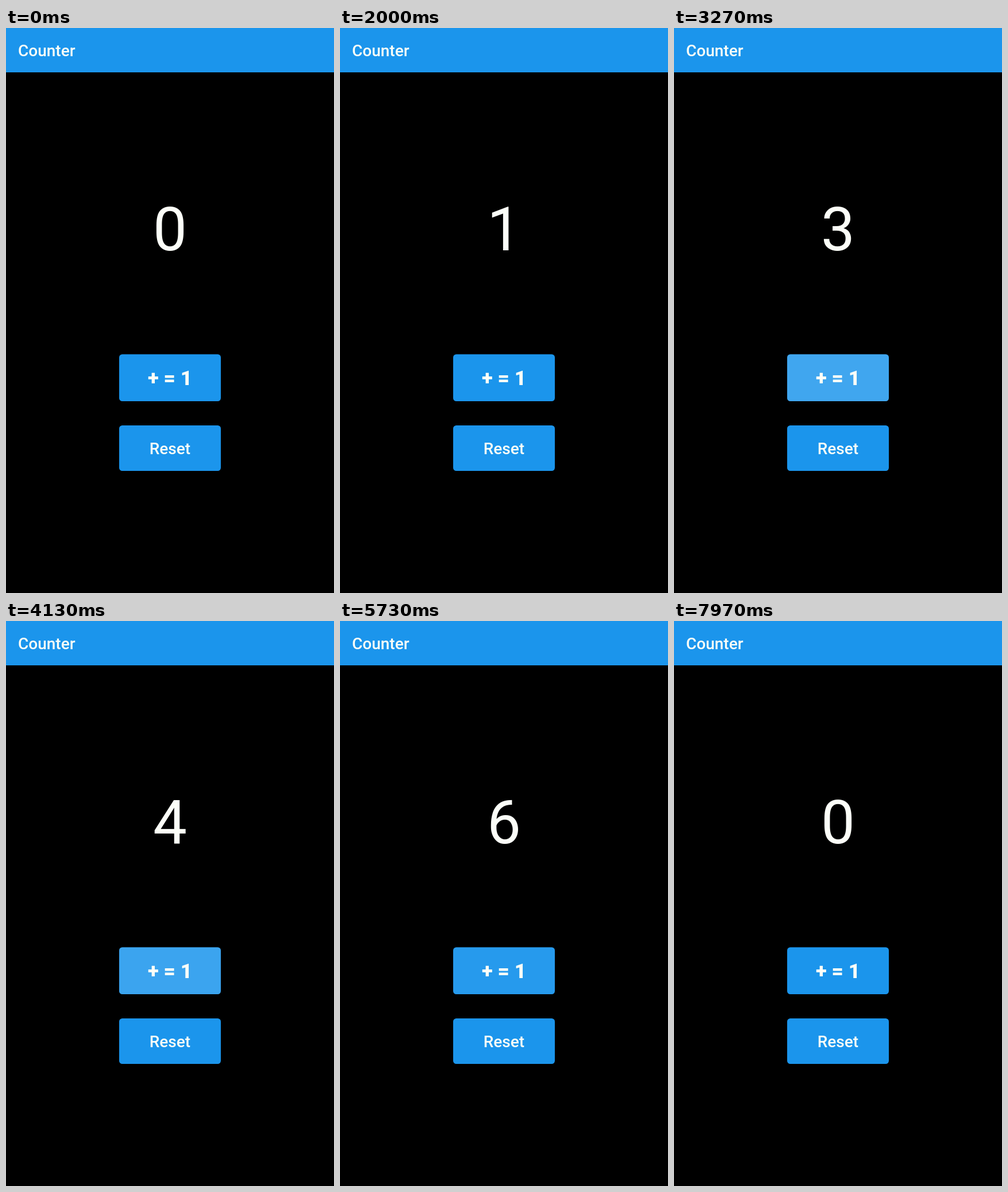
Write an HTML page with a canvas that moves like this. It is 571 px wide and 981 px high and loops after 8000 ms.

```html
<!DOCTYPE html>
<html lang="en">
<head>
<meta charset="utf-8">
<title>Counter</title>
<style>
  html, body { margin: 0; width: 100%; height: 100%; overflow: hidden; background: #000; }
  canvas { display: block; width: 571px; height: 981px; }
</style>
</head>
<body>
<canvas id="stage" width="571" height="981"></canvas>
<script>
const ctx = document.getElementById("stage").getContext("2d");
const LOOP = 8000;
const PRESS = 90;
const BLUE = "#1b95ec";
const WHITE = "#fcfef8";

const addButton = {
  x: 197, y: 566.5, w: 177, h: 81.5, label: "+ = 1", weight: 900, size: 35, baseline: 620,
  touch: [318, 618], taps: [1570, 2350, 3130, 3890, 4610, 5400, 6190]
};
const resetButton = {
  x: 197, y: 690, w: 177, h: 79, label: "Reset", weight: 500, size: 28, baseline: 740,
  touch: [310, 738], taps: [7190]
};

const clamp = v => Math.max(0, Math.min(1, v));
const mix = (a, b, p) => a + (b - a) * p;
const easeOut = p => 1 - (1 - p) ** 3;

function text(str, x, y, weight, size, align) {
  ctx.font = `${weight} ${size}px Roboto, sans-serif`;
  ctx.textAlign = align;
  ctx.fillStyle = WHITE;
  ctx.fillText(str, x, y);
}

// The ripple spreads while pressed, holds after release, then fades.
function ripple(b, t, release) {
  const age = t - release + PRESS;
  if (age < 0 || age > PRESS + 375) return;
  const grow = easeOut(clamp(age / 225));
  const fade = clamp(age / 75) * (1 - clamp((t - release - 225) / 150));
  const full = Math.hypot(b.w, b.h) / 2 + 7;
  ctx.fillStyle = `rgba(255,255,255,${0.16 * fade})`;
  ctx.beginPath();
  ctx.arc(
    mix(b.touch[0], b.x + b.w / 2, grow),
    mix(b.touch[1], b.y + b.h / 2, grow),
    full * mix(0.3, 1, grow), 0, Math.PI * 2
  );
  ctx.fill();
}

function button(b, t) {
  ctx.save();
  ctx.beginPath();
  ctx.roundRect(b.x, b.y, b.w, b.h, 5.5);
  ctx.fillStyle = BLUE;
  ctx.fill();
  ctx.clip();
  b.taps.forEach(release => ripple(b, t, release));
  ctx.restore();
  text(b.label, b.x + b.w / 2, b.baseline, b.weight, b.size, "center");
}

function draw(t) {
  ctx.fillStyle = "#000";
  ctx.fillRect(0, 0, 571, 981);
  ctx.fillStyle = BLUE;
  ctx.fillRect(0, 0, 571, 77);
  text("Counter", 21, 48.5, 500, 28, "left");

  const count = t < resetButton.taps[0] ? addButton.taps.filter(tap => tap <= t).length : 0;
  text(String(count), 285.5, 386, 400, 105, "center");

  button(addButton, t);
  button(resetButton, t);
}

const start = performance.now();
function frame() {
  draw((performance.now() - start) % LOOP);
  requestAnimationFrame(frame);
}
frame();
</script>
</body>
</html>
```
